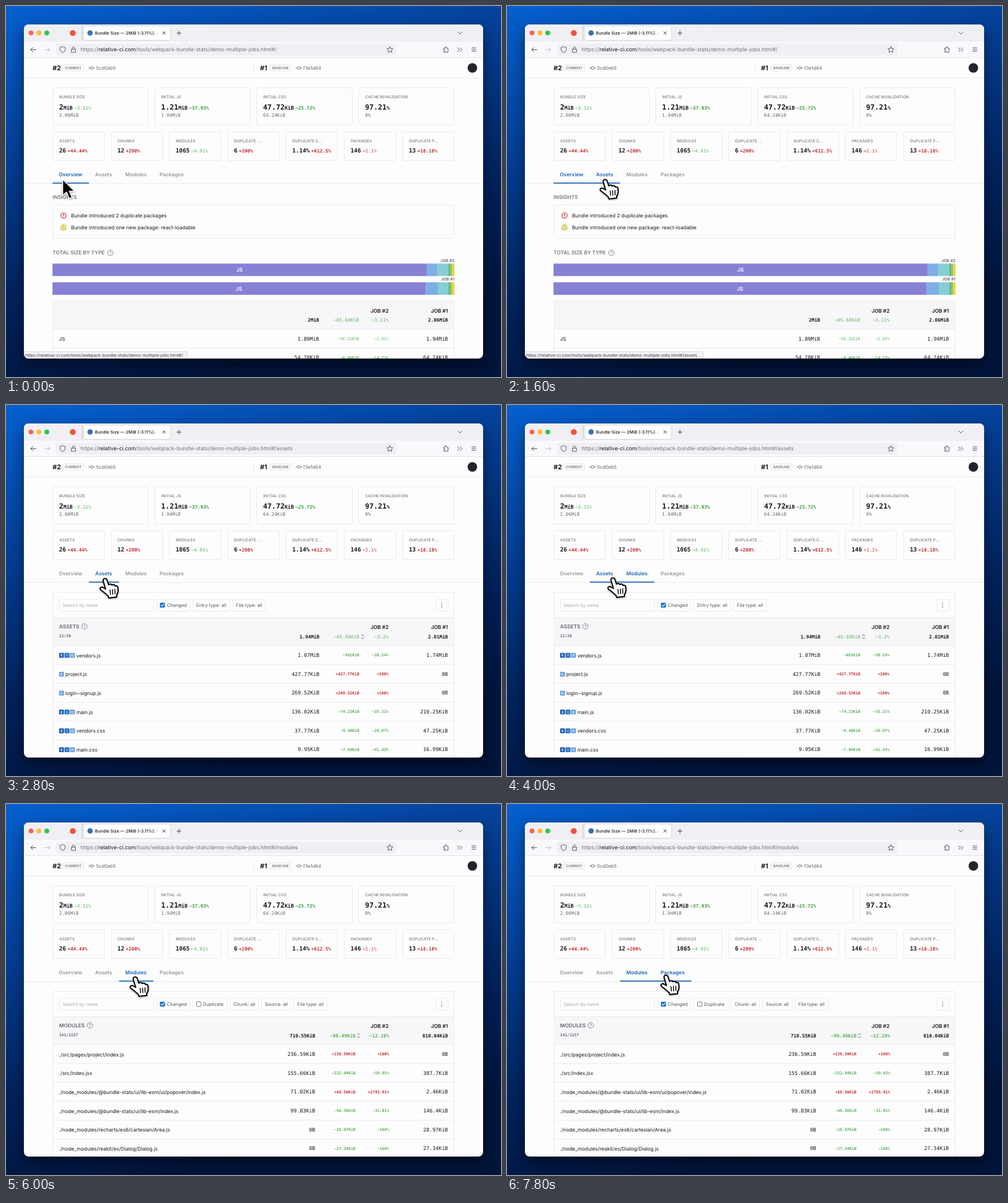
An HTML page that plays this animation: 830 px wide and 623 px high, repeating every 8 s.

```html
<!DOCTYPE html>
<html lang="en">
<head>
<meta charset="utf-8">
<title>Bundle stats</title>
<style>
  html, body { margin: 0; height: 100%; overflow: hidden; background: #021a4a; }
  svg { display: block; width: 100vw; height: 100vh; }
  text { font-family: Inter, sans-serif; text-rendering: geometricPrecision; white-space: pre; }
  .mono { font-family: "DejaVu Sans Mono", monospace; }
  .window { filter: drop-shadow(0 9px 11px rgba(0, 0, 0, .5)); }
  .cursor { filter: drop-shadow(0 1.5px 1.5px rgba(0, 0, 0, .4)); }
</style>
</head>
<body>
<svg viewBox="0 0 830 623">
  <defs>
    <linearGradient id="sky" x1="0" y1="0" x2=".35" y2="1">
      <stop offset="0" stop-color="#0560cf"/>
      <stop offset=".35" stop-color="#044097"/>
      <stop offset=".7" stop-color="#02235e"/>
      <stop offset="1" stop-color="#01143a"/>
    </linearGradient>
    <clipPath id="frame"><rect x="30" y="31" width="770" height="561" rx="8"/></clipPath>
  </defs>
  <rect width="830" height="623" fill="url(#sky)"/>
  <rect class="window" x="30" y="31" width="770" height="561" rx="8" fill="#fefdfe"/>
  <g clip-path="url(#frame)"><g id="chrome"></g><g id="page"></g></g>
  <g id="pointer"></g>
</svg>
<script>
const LOOP = 8000, STEP = 200;
const INK = '#17171a', GREY = '#8b8b90', BLUE = '#1d65b0', BORDER = '#e9e8ec';
const GREEN = '#2f9f35', MID_GREEN = '#55b259', PALE_GREEN = '#84cd88', RED = '#c22f34', PALE_RED = '#da777a';
const BASE = '/tools/webpack-bundle-stats/demo-multiple-jobs.html#/';

// Drawing helpers: each returns SVG markup
const rect = (x, y, x2, y2, fill, extra = '') =>
  `<rect x="${x}" y="${y}" width="${x2 - x}" height="${y2 - y}" fill="${fill}" ${extra}/>`;
const box = (x, y, x2, y2, fill = 'none') => rect(x, y, x2, y2, fill, `rx="2" stroke="${BORDER}"`);
const dot = (x, y, r, fill, extra = '') => `<circle cx="${x}" cy="${y}" r="${r}" fill="${fill}" ${extra}/>`;
const line = (d, color = '#5b5b66', width = 1) =>
  `<path d="${d}" fill="none" stroke="${color}" stroke-width="${width}" stroke-linecap="round" stroke-linejoin="round"/>`;
const text = (x, y, s, size, fill = INK, weight = 400, extra = '') =>
  `<text x="${x}" y="${y}" font-size="${size}" fill="${fill}" font-weight="${weight}" ${extra}>${s}</text>`;
const END = 'text-anchor="end"', MIDDLE = 'text-anchor="middle"', MONO = 'class="mono"';
const mono = (x, y, s, size, fill, weight, extra = '') => text(x, y, s, size, fill, weight, MONO + ' ' + extra);
const span = (s, size, fill = INK, dx = 0) => `<tspan font-size="${size}" fill="${fill}" dx="${dx}">${s}</tspan>`;
const help = (x, y) => dot(x, y, 4.6, 'none', 'stroke="#77777c" stroke-width=".9"') +
  text(x, y + 2.5, '?', 7, '#77777c', 500, MIDDLE);

function browserBar() {
  return rect(30, 31, 800, 60, '#f0eff4') + rect(30, 60, 800, 86, '#f9f8fb') +
    ['#fd5f57', '#febb2e', '#28c840'].map((c, i) => dot(42 + i * 13.2, 45.3, 4, c)).join('') +
    dot(112, 45.5, 5, '#f0563b') + line('M127.5 33V58', '#bcbbc2', .8) +
    rect(130, 33.5, 276, 57.5, '#fff', 'rx="3" stroke="#c9c8d0" stroke-width=".8"') +
    dot(141, 45.3, 4.5, '#3c71ad') +
    text(149, 48.3, 'Bundle Size — 2MiB (-3.11%). <tspan fill="#aaa">-</tspan>', 7.25, INK, 500) +
    line('M262.8 43l4.6 4.6m0-4.6l-4.6 4.6', '#333') + line('M286.5 45.5h7m-3.5-3.5v7', '#444') +
    line('M757.5 43.5l3.5 3.5 3.5-3.5') +
    rect(84, 63.5, 654, 83, '#f0eff4', 'rx="2.5"') +
    line('M50 73.3H41.5m3.5-3.5l-3.5 3.5 3.5 3.5', '#45454d') +
    line('M65 73.3h8.5m-3.5-3.5l3.5 3.5-3.5 3.5', '#bbbac2') +
    line('M95 68.3l4.3 1.6v3.3q-.4 3.6-4.3 5.2q-3.9-1.6-4.3-5.2v-3.3z') +
    line('M110 72.5h6.5v5.3H110zM111.2 72.3v-1.6a2 2 0 0 1 4 0v1.6') +
    line('M643.7 68.2l1.5 3.3 3.6.4-2.7 2.4.8 3.6-3.2-1.9-3.2 1.9.8-3.6-2.7-2.4 3.6-.4z') +
    line('M734 71h2.2q-.7-2.7 1.3-2.7t1.3 2.7h2.4v6.5H734v-2q2.4.2 2.4-1.2t-2.4-1.2z') +
    line('M757 70l3.3 3.3-3.3 3.3M761.5 70l3.3 3.3-3.3 3.3') +
    line('M781 70.3h7M781 73.2h7M781 76.1h7') +
    line('M30 86.5H800', '#dedde3', .8);
}

function jobHeader(x, name, label, hash, badgeEnd) {
  const commit = badgeEnd + 8;
  return text(x, 108, name, 11, INK, 700) + rect(x + 16.5, 98.5, badgeEnd, 109, '#f8f7f9', `rx="2" stroke="${BORDER}"`) +
    text((x + 16.5 + badgeEnd) / 2, 106.1, label, 5.7, '#77777c', 600, MIDDLE) +
    line(`M${commit} 104h2.5m5 0h2.5`, '#77777c') +
    dot(commit + 5, 104, 2.3, 'none', 'stroke="#77777c"') +
    text(commit + 12.5, 106.9, hash, 7.85, '#66666b');
}

function summary() {
  const large = [
    ['BUNDLE SIZE', '2', 'MiB', '−3.11%', '2.06MiB', PALE_GREEN],
    ['INITIAL JS', '1.21', 'MiB', '−37.93%', '1.94MiB', GREEN],
    ['INITIAL CSS', '47.72', 'KiB', '−25.72%', '64.24KiB', GREEN],
    ['CACHE INVALIDATION', '97.21', '%', '', '0%', GREEN],
  ].map(([label, value, unit, delta, before, color], i) => {
    const x = 78.5 + i * 171;
    return box(x, 137.5, x + 160, 200) + text(x + 10.7, 155.2, label, 6.65, GREY, 600) +
      mono(x + 10.5, 174.3, span(value, 12) + span(unit, 8.6) + span(delta, 7.9, color, 2.5), 12, INK, 700) +
      mono(x + 10.5, 186.2, before, 7.75, '#66666b');
  });
  const small = [
    ['ASSETS', '26', '+44.44%', RED], ['CHUNKS', '12', '+200%', RED], ['MODULES', '1065', '−4.91%', PALE_GREEN],
    ['DUPLICATE ...', '6', '+200%', RED], ['DUPLICATE C...', '1.14%', '+612.5%', RED],
    ['PACKAGES', '146', '+2.1%', PALE_RED], ['DUPLICATE P...', '13', '+18.18%', RED],
  ].map(([label, value, delta, color], i) => {
    const x = 78.5 + i * 97.75;
    return box(x, 211, x + 86.5, 259.5) + text(x + 10.7, 228.6, label, 6.65, GREY, 600) +
      mono(x + 10.5, 245.8, span(value, 9.7) + span(delta, 7.9, color, 2.5), 9.7, INK, 700);
  });
  return jobHeader(78, '#2', 'CURRENT', '5cd0eb5', 130.5) + jobHeader(426, '#1', 'BASELINE', 'f3e1d64', 478) +
    line('M415.5 98V110', BORDER) + dot(782, 104, 8, '#24242a') + line('M30 121H800', BORDER) +
    large.join('') + small.join('') + line('M30 298H800', BORDER);
}

const tabs = [['Overview', 78, 139], ['Assets', 139, 189.5], ['Modules', 189.5, 247], ['Packages', 247, 309]];
const tabBar = (active, hover) => tabs.map(([name, x, x2], i) => {
  const lit = i === active || i === hover;
  return text(x + 10.5, 286, name, 8.6, lit ? BLUE : '#98979c', 600) +
    (lit ? rect(x, 296.5, x2, 298.3, BLUE) : '');
}).join('');

const deltaColor = s => s[0] === '+' ? RED : MID_GREEN;

// cols: right edges of size, delta and percent columns
function table(top, cols, head, rows, headColor, cell) {
  const right = [...cols, 741];
  const header = rect(78.5, top, 751.5, top + 47, '#f7f6f9') + line(`M78.5 ${top}H751.5M78.5 ${top + 47}H751.5`, BORDER) +
    text(641.5, top + 19, 'JOB #2', 8.6, INK, 600, END) + text(741, top + 19, 'JOB #1', 8.6, INK, 600, END) +
    head.map((s, i) => mono(right[i], top + 34.7, s, 7.9, i === 1 || i === 2 ? headColor : INK, 700, END)).join('');
  return header + rows.map((row, r) => {
    const y = top + 65.8 + r * 31.7;
    const values = row.slice(1).map((s, i) => i === 1 || i === 2
      ? mono(right[i], y - .6, s, 6.6, row.color || deltaColor(s), 700, END)
      : mono(right[i], y, s, 8.6, INK, 400, END));
    return cell(row[0], y + .7) + values.join('') + line(`M78.5 ${y + 13}H751.5`, BORDER);
  }).join('');
}

function sizeBar(y, label, stops) {
  const colors = ['#8781d5', '#80aee6', '#86ced3', '#5fb98a', '#a9c653', '#e6d54e'];
  return text(752, y - 3, label, 6.8, '#66666b', 600, END) +
    colors.map((c, i) => rect(stops[i], y, stops[i + 1], y + 21, c)).join('') +
    text((stops[0] + stops[1]) / 2, y + 13.8, 'JS', 8.7, '#fff', 600, MIDDLE);
}

function overview() {
  const first = ['JS', '1.89MiB', '−56.21KiB', '−2.82%', '1.94MiB'];
  first.color = PALE_GREEN;
  return text(78, 323.5, 'INSIGHTS', 8.6, '#77777c', 600) + box(78.5, 334, 751.5, 390) +
    dot(96.5, 352, 6.5, '#fbe3e4') + dot(96.5, 352, 4.4, 'none', `stroke="${RED}"`) +
    line('M96.5 349.7v2.5m0 1.8v.1', RED) + text(109, 355.1, 'Bundle introduced 2 duplicate packages', 8.45) +
    dot(96.5, 371.5, 6.5, '#e3edb9') + line('M96.5 367.3l4.5 7.5h-9zM96.5 370v2m0 1.3v.1', '#eda63c', .9) +
    text(109, 374.9, 'Bundle introduced one new package: react-loadable', 8.45) +
    text(78, 417.2, 'TOTAL SIZE BY TYPE', 8.6, '#77777c', 600) + help(175, 414.5) +
    sizeBar(432.5, 'JOB #2', [78, 705, 723.5, 742, 745, 748, 752]) +
    sizeBar(464, 'JOB #1', [78, 703, 724, 742, 745, 748, 752]) +
    box(78.5, 496, 751.5, 620) +
    table(495.7, [525, 592, 641.5], ['2MiB', '−65.68KiB', '−3.11%', '2.06MiB'],
      [first, ['', '54.78KiB', '−9.46KiB', '−14.73%', '64.24KiB']], PALE_GREEN, (s, y) => text(89, y, s, 8.4));
}

function chip([x, x2, label, checked]) {
  const check = checked === undefined ? '' : checked
    ? rect(x + 5, 332, x + 13.5, 340.3, '#1c72ce', 'rx="1.5"') + line(`M${x + 7} 336.2l1.7 1.7 3-3.5`, '#fff', 1.2)
    : rect(x + 6, 332.3, x + 13.5, 339.8, '#fff', 'rx="1" stroke="#77777c"');
  return box(x, 326, x2, 346.5) + check + text(x + (check ? 16.8 : 5.6), 339, label, 7.75, '#55555a');
}

function listing(title, count, helpX, chips, sortX, body) {
  return box(78.5, 314.5, 751.5, 620) + box(89.5, 326, 247, 346.5) + text(95, 339, 'Search by name', 7.75, '#a9a8ae') +
    chips.map(chip).join('') + box(720.5, 326, 741, 346.5) +
    [333, 336.2, 339.4].map(y => dot(730.5, y, .8, '#55555a')).join('') + body +
    text(89, 374.7, title, 8.65, '#66666b', 600) + help(helpX, 371.7) +
    mono(89, 390, count, 6.6, '#66666b', 700) +
    line(`M${sortX - 2} 387.5l2-2.2 2 2.2m-4 3l2 2.2 2-2.2`, '#55555a', .9);
}

function assetName(name, y) {
  const entry = /^(vendors|main)/.test(name);
  const badges = entry ? [['E', '#1f60af'], ['I', '#2c74c4'], ['C', '#70a5db']] : [['C', '#70a5db']];
  return badges.map(([letter, color], i) => rect(89 + i * 9.2, y - 7.2, 97.2 + i * 9.2, y + 1, color, 'rx="1.3"') +
    text(93.1 + i * 9.2, y - 1.1, letter, 5.4, '#fff', 700, MIDDLE)).join('') +
    text(entry ? 118 : 99.5, y, name, 8.4);
}

const assets = () => listing('ASSETS', '12/26', 131.5,
  [[253, 308, 'Changed', true], [313.5, 375, 'Entry type: all'], [380, 435, 'File type: all']], 598,
  table(357, [525.5, 592.5, 641.5], ['1.94MiB', '−65.68KiB', '−3.2%', '2.01MiB'], [
    ['vendors.js', '1.07MiB', '−681KiB', '−38.24%', '1.74MiB'],
    ['project.js', '427.77KiB', '+427.77KiB', '+100%', '0B'],
    ['login~signup.js', '269.52KiB', '+269.52KiB', '+100%', '0B'],
    ['main.js', '136.02KiB', '−74.23KiB', '−35.31%', '210.25KiB'],
    ['vendors.css', '37.77KiB', '−9.48KiB', '−20.07%', '47.25KiB'],
    ['main.css', '9.95KiB', '−7.04KiB', '−41.43%', '16.99KiB'],
  ], PALE_GREEN, assetName));

const modules = () => listing('MODULES', '141/1157', 140.5,
  [[253, 308, 'Changed', true], [313.5, 371, 'Duplicate', false], [376, 423.5, 'Chunk: all'],
    [428.5, 478, 'Source: all'], [483, 538, 'File type: all']], 591,
  table(357, [518.5, 586, 642.5], ['710.55KiB', '−99.49KiB', '−12.28%', '810.04KiB'], [
    ['./src/pages/project/index.js', '236.59KiB', '+236.59KiB', '+100%', '0B'],
    ['./src/index.jsx', '155.66KiB', '−232.04KiB', '−59.85%', '387.7KiB'],
    ['./node_modules/@bundle-stats/ui/lib-esm/ui/popover/index.js', '71.02KiB', '+68.56KiB', '+2785.91%', '2.46KiB'],
    ['./node_modules/@bundle-stats/ui/lib-esm/index.js', '99.83KiB', '−46.56KiB', '−31.81%', '146.4KiB'],
    ['./node_modules/recharts/es6/cartesian/Area.js', '0B', '−28.97KiB', '−100%', '28.97KiB'],
    ['./node_modules/reakit/es/Dialog/Dialog.js', '0B', '−27.34KiB', '−100%', '27.34KiB'],
  ], MID_GREEN, (s, y) => text(89, y, s, 8.4)));

function statusBar(route, opacity) {
  const width = { '': 274, assets: 299, modules: 304 }[route];
  return `<g opacity="${opacity}">` +
    rect(29, 580.5, 30 + width, 593, '#f4f3f6', 'rx="2" stroke="#cfced4" stroke-width=".8"') +
    text(32, 589.2, 'https://relative-ci.com' + BASE + route, 7.15, '#3a3a40') + '</g>';
}

const arrow = '<path d="M0 0V27.5L6.5 21.5 11 32.5 15.8 30.5 11.2 20H20Z" fill="#000" stroke="#fff" stroke-width="1.6" stroke-linejoin="round"/>';
const hand = '<path d="M-3.5 3.5C-4.5-1 1.5-2 3 2L5.5 10C7 8 10.5 8.5 11 10.5 13 9 16 9.5 16.5 12 19 11 21 12.5 21 15 22 20 21.5 24 19 27V30.5L6 32 5 29C1 25-3 22-7.5 18.5-11 15-6 12.5-3 15L.5 17Z" fill="#fff" stroke="#000" stroke-width="2" stroke-linejoin="round"/>' +
  line('M8 18.5l.7 7.5M12 18l.5 7.8M16 17.5l.3 7.8', '#000', 1.5);

// Timelines: [time, value]
const pageKeys = [[0, 0], [2000, 1], [5400, 2]];
const routeKeys = [[0, ''], [1800, 'assets'], [5200, 'modules']];
const hoverKeys = [[0, 0], [1200, 1], [4000, 2], [7600, 3]];
const linkKeys = [[0, ''], [1200, 'assets'], [4200, 'modules']];
const statusKeys = [[0, 1], [1800, .5], [2000, .05], [2200, 0], [4200, 1], [5200, .5], [5400, 0]];
const scrollKeys = [[0, 0], [2000, 1], [2400, .5], [2600, 0], [5400, 1], [5800, 0]];
const cursorKeys = [[0, 95, 291], [400, 102, 290], [800, 103, 290], [1600, 165, 292], [2000, 166, 292], [3600, 167, 292],
  [4000, 178, 291], [4600, 217, 290], [5200, 218, 290], [6000, 217, 291], [7000, 217, 291], [7800, 267, 288]];

const at = (keys, t) => keys.filter(k => k[0] <= t).pop()[1];

function cursorAt(t) {
  const i = cursorKeys.findIndex(k => k[0] > t);
  const [t0, x0, y0] = cursorKeys.at(i < 0 ? -1 : i - 1);
  if (i < 0) return [x0, y0];
  const [t1, x1, y1] = cursorKeys[i];
  const p = (t - t0) / (t1 - t0), e = p * p * (3 - 2 * p);
  return [x0 + (x1 - x0) * e, y0 + (y1 - y0) * e];
}

const byId = id => document.getElementById(id);
byId('chrome').innerHTML = browserBar() + summary();
const panels = [overview(), assets(), modules()];

function draw(t) {
  const page = at(pageKeys, t), status = at(statusKeys, t), scroll = at(scrollKeys, t);
  byId('page').innerHTML =
    text(125, 76.4, `https://<tspan fill="${INK}">relative-ci.com</tspan>${BASE}${at(routeKeys, t)}`, 8.87, '#75747c') +
    tabBar(page, at(hoverKeys, t)) + panels[page] +
    (scroll ? rect(795, 88, 799, 414, '#85858a', `rx="2" opacity="${scroll}"`) : '') +
    (status ? statusBar(at(linkKeys, t), status) : '');
  byId('pointer').innerHTML =
    `<g class="cursor" transform="translate(${cursorAt(t)})">${t < 400 ? arrow : hand}</g>`;
}

let shown = -1;
function tick() {
  const step = Math.floor(performance.now() % LOOP / STEP);
  if (step !== shown) draw((shown = step) * STEP);
  requestAnimationFrame(tick);
}
tick();
</script>
</body>
</html>
```
